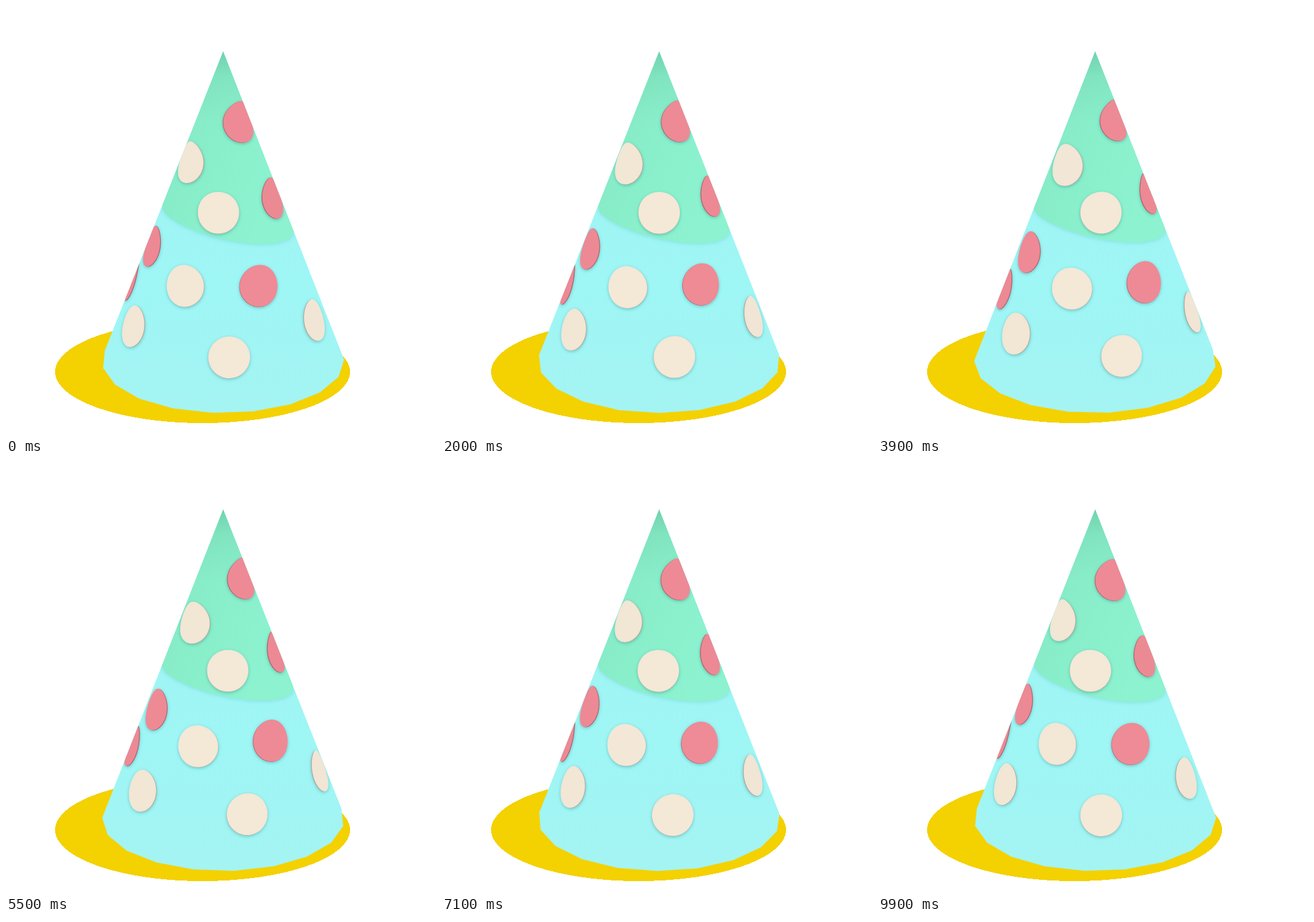
Animation, 700 px wide and 700 px high, one loop 10 s. Source, as an HTML page:

```html
<!DOCTYPE html>
<html lang="en">
<head>
<meta charset="utf-8">
<title>Party hat</title>
<style>
  html, body { margin: 0; width: 100%; height: 100%; overflow: hidden; background: #fff; }
  svg { display: block; width: 100%; height: 100%; }
</style>
</head>
<body>
<svg id="stage" viewBox="0 0 700 700" xmlns="http://www.w3.org/2000/svg">
  <defs>
    <linearGradient id="blue" gradientUnits="userSpaceOnUse" x1="0" y1="330" x2="0" y2="662">
      <stop offset="0" stop-color="#9ff5f4"/>
      <stop offset=".4" stop-color="#9ef6f5"/>
      <stop offset="1" stop-color="#a4f4f2"/>
    </linearGradient>
    <linearGradient id="green" gradientUnits="userSpaceOnUse" x1="280" y1="260" x2="425" y2="318">
      <stop offset="0" stop-color="#87ecc7"/>
      <stop offset=".5" stop-color="#8af0cc"/>
      <stop offset="1" stop-color="#8cf2cf"/>
    </linearGradient>
    <linearGradient id="tipShade" gradientUnits="userSpaceOnUse" x1="0" y1="73" x2="0" y2="190">
      <stop offset="0" stop-color="#51ad8a" stop-opacity=".42"/>
      <stop offset=".35" stop-color="#51ad8a" stop-opacity=".14"/>
      <stop offset="1" stop-color="#51ad8a" stop-opacity="0"/>
    </linearGradient>
    <filter id="soft" x="-40%" y="-40%" width="180%" height="180%">
      <feDropShadow dx="0" dy="1.5" stdDeviation="2.5" flood-color="#1f7078" flood-opacity=".35"/>
    </filter>
    <filter id="seamShadow" x="-10%" y="-10%" width="120%" height="120%">
      <feDropShadow dx="0" dy="1" stdDeviation="3" flood-color="#3b93a0" flood-opacity=".25"/>
    </filter>
    <clipPath id="hatClip"><path id="clipShape"/></clipPath>
  </defs>
  <rect width="700" height="700" fill="#fff"/>
  <ellipse cx="320" cy="595.5" rx="240" ry="83.5" fill="#f4d100" shape-rendering="crispEdges"/>
  <path id="body" fill="url(#blue)"/>
  <g clip-path="url(#hatClip)">
    <path id="cap" fill="url(#green)" filter="url(#seamShadow)"/>
    <path id="capTip" fill="url(#tipShade)"/>
    <g id="dots"></g>
  </g>
</svg>
<script>
const LOOP = 10000, STEP = 100, SWING = 12;
const RISE_END = 4350, FALL_END = 9000;
const TIP = { x: 353.5, y: 73.6 }, RADIUS = 197, HEIGHT = 505, DEPTH = 84;
const DOT_RADIUS = 34, DOT_LIFT = 1.4, EDGE = 99.6;
const FACET = 19.4, FACET_PHASE = -5.1;
const CREAM = [244, 232, 215], PINK = [239, 139, 150];

// Distance down the cone (0 tip, 1 rim), angle from the front, colour.
const DOTS = [
  [.205, 49, PINK], [.33, -60, CREAM], [.4468, -5.2, CREAM], [.4467, 69.5, PINK],
  [.606, -77.5, PINK], [.752, -95.5, PINK], [.6602, -28.8, CREAM],
  [.6587, 26.9, PINK], [.827, -64.5, CREAM], [.8156, 68, CREAM], [.8465, 3.4, CREAM]
];

const $ = id => document.getElementById(id);
const svgNode = name => document.createElementNS("http://www.w3.org/2000/svg", name);
const rad = deg => deg * Math.PI / 180;
const clampAngle = deg => Math.max(-EDGE, Math.min(EDGE, deg));

function onCone(down, deg, lift = 0) {
  const a = rad(deg);
  return [TIP.x + (RADIUS * down + lift) * Math.sin(a),
          TIP.y + down * (HEIGHT + DEPTH * Math.cos(a))];
}

const toPath = points =>
  "M" + points.map(p => p.map(v => v.toFixed(2)).join(" ")).join("L") + "Z";

const dots = DOTS.map(([down, angle, color]) => {
  const group = svgNode("g"), side = svgNode("path"), face = svgNode("path");
  group.setAttribute("filter", "url(#soft)");
  group.append(side, face);
  $("dots").append(group);
  return { down, angle, color, side, face };
});

function dotPath(down, angle) {
  const points = [];
  for (let i = 0; i < 72; i++) {
    const a = i / 72 * 2 * Math.PI;
    const f = down + DOT_RADIUS / (HEIGHT + DEPTH) * Math.sin(a);
    const bend = RADIUS * (f + down) / 2;
    const spread = DOT_RADIUS * Math.cos(a) / bend * 180 / Math.PI;
    points.push(onCone(f, clampAngle(angle + spread), DOT_LIFT));
  }
  return toPath(points);
}

const shade = (color, k) => `rgb(${color.map(v => Math.round(v * k)).join(",")})`;

function swing(t) {
  if (t < RISE_END) return .5 - .5 * Math.cos(Math.PI * t / RISE_END);
  if (t < FALL_END) return .5 + .5 * Math.cos(Math.PI * (t - RISE_END) / (FALL_END - RISE_END));
  return 0;
}

function render(t) {
  const q = swing(t), turn = SWING * q;
  const rim = [[TIP.x, TIP.y]], seam = [[TIP.x, TIP.y]];
  for (let k = -5; k <= 5; k++) {
    const angle = FACET_PHASE + FACET * k + turn;
    const a = clampAngle(angle);
    rim.push(onCone(1, angle));
    seam.push(onCone(.545 + .047 * Math.sin(rad(a - 32 - 6 * q)), a));
  }
  for (const id of ["body", "clipShape"]) $(id).setAttribute("d", toPath(rim));
  for (const id of ["cap", "capTip"]) $(id).setAttribute("d", toPath(seam));

  for (const { down, angle, color, side, face } of dots) {
    const a = angle + turn, lean = Math.sin(rad(a));
    const d = dotPath(down, a);
    side.setAttribute("d", d);
    side.setAttribute("transform", `translate(${(-1.3 * lean).toFixed(2)} .5)`);
    side.setAttribute("fill", shade(color, .72));
    face.setAttribute("d", d);
    face.setAttribute("fill", shade(color, 1 - .012 * lean * lean));
  }
}

function tick() {
  const t = performance.now() % LOOP;
  render(Math.floor(t / STEP) * STEP);
  requestAnimationFrame(tick);
}
tick();
</script>
</body>
</html>
```
